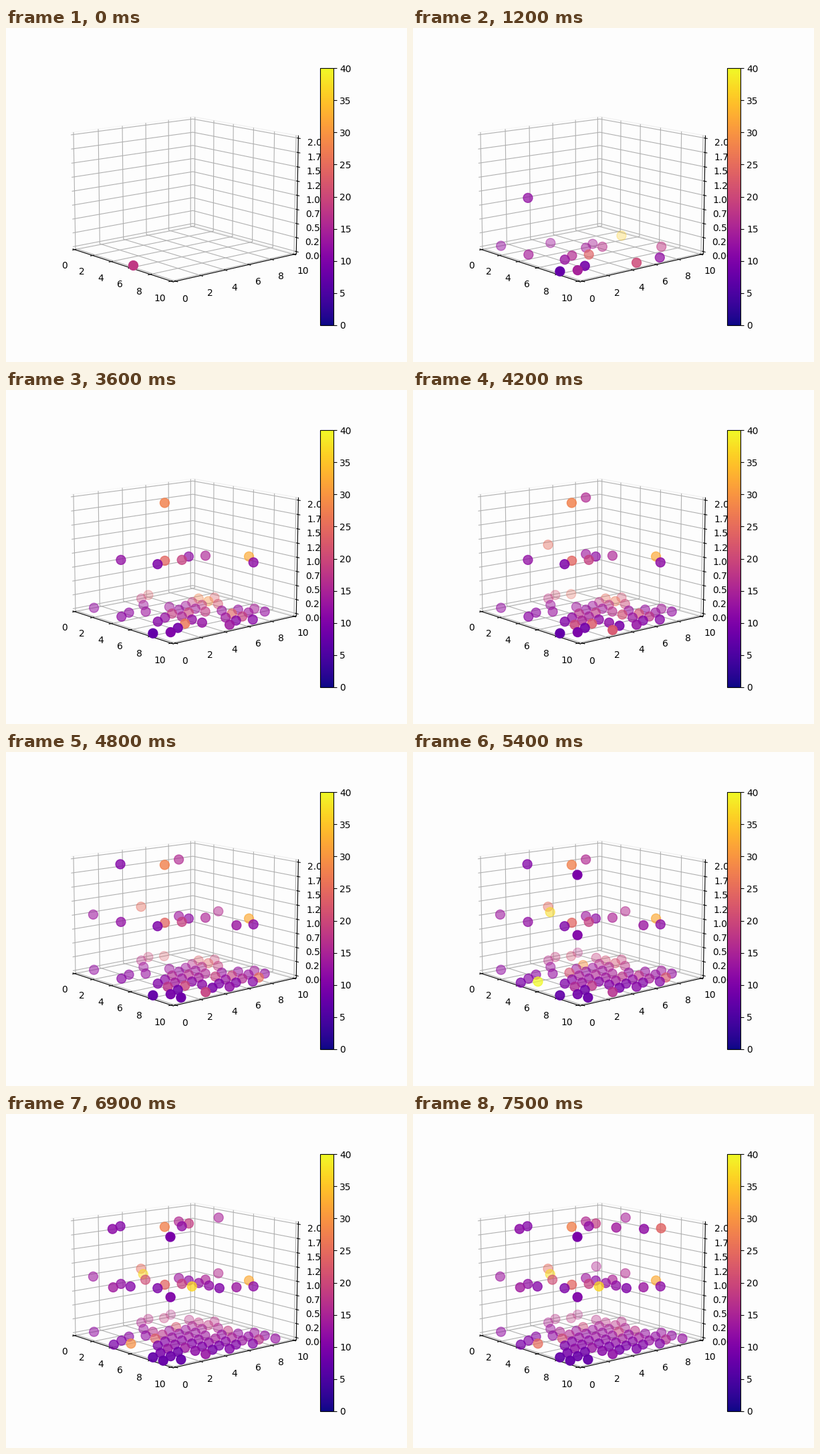
A matplotlib script for the animation above (7.8 s loop, 600 by 500 pixels).

```python
import math
import random

import matplotlib.pyplot as plt
from matplotlib.animation import FuncAnimation
from matplotlib.cm import ScalarMappable
from matplotlib.colors import Normalize

FRAMES, INTERVAL = 26, 300
LAST = FRAMES - 1
VMAX = 40
FIRST_DOT = (6, 0, 0)

# Columns that grow above the floor, in order; a repeat adds a storey.
GROWTH = [
    (3.5, 1), (9.5, 7), (6, 2), (5.5, 3), (6, 4), (5.5, 5), (8, 8),
    (6, 6), (5.5, 3), (0.5, 5), (4.5, 5), (4.5, 5), (9, 6), (5, 8),
    (3.5, 1), (0.5, 1), (8.5, 1), (8.5, 1), (2, 4), (7.5, 5), (8.5, 5),
    (6, 4), (5.5, 5), (5, 8), (4, 0), (4, 0), (4.5, 1), (3.5, 3),
    (7, 4), (6.5, 5), (2, 8), (7.5, 5), (9, 6), (9.5, 7),
]

rng = random.Random(4)


def grow_columns():
    """Storeys arrive ever faster; each base lands some time before."""
    born = {}
    for n, (x, y) in enumerate(GROWTH, 1):
        time = round(LAST * (n / len(GROWTH)) ** 0.555)
        if (x, y, 0) not in born:
            born[x, y, 0] = math.ceil(time * rng.random())
        level = sum((x, y, z) in born for z in range(3))
        born[x, y, level] = time
    return born


def is_filled(col, row):
    """The floor stays sparse on the left and at two middle edges."""
    if col < 3:
        return col == 0 and row > 5
    return abs(col - 5) > 1 or 3 <= row <= 8


def fill_floor(born):
    """Other floor sites of the staggered lattice, middle rows sooner."""
    for row in range(10):
        for col in range(10):
            site = (col + row % 2 / 2, row, 0)
            if is_filled(col, row) and site not in born:
                born[site] = math.ceil(rng.random() * (18 + 3 * abs(row - 5)))


born = grow_columns()
fill_floor(born)
heat = {site: rng.expovariate(1 / 6) for site in born}


def value(site, frame):
    """Higher towards the back; floor sites cool down with age."""
    x, y, z = site
    cooling = math.exp((born[site] - frame) / 8) if z == 0 else 1
    return min(VMAX, 12 + 0.6 * (y - x) + heat[site] * cooling)


def sites_at(frame):
    if frame == 0:
        return {FIRST_DOT: 18}
    return {s: value(s, frame) for s, start in born.items() if start <= frame}


fig = plt.figure(figsize=(6, 5), dpi=100, facecolor="#fdfdfd")
ax = fig.add_subplot(projection="3d", facecolor="none")
ax.view_init(elev=12, azim=-40)
margin = 1 / 48
ax.set_xlim(0, 10, view_margin=margin)
ax.set_ylim(0, 10, view_margin=margin)
ax.set_zlim(0, 2, view_margin=margin)
for axis in (ax.xaxis, ax.yaxis, ax.zaxis):
    axis.pane.fill = False

norm = Normalize(0, VMAX)
fig.colorbar(ScalarMappable(norm, "plasma"), ax=ax)
dots = None


def draw(frame):
    global dots
    if dots is not None:
        dots.remove()
    sites = sites_at(frame)
    dots = ax.scatter(*zip(*sites), c=list(sites.values()), s=100,
                      cmap="plasma", norm=norm)
    return [dots]


anim = FuncAnimation(fig, draw, frames=FRAMES, interval=INTERVAL,
                     init_func=lambda: [], repeat=True, repeat_delay=0)
plt.show()
```
